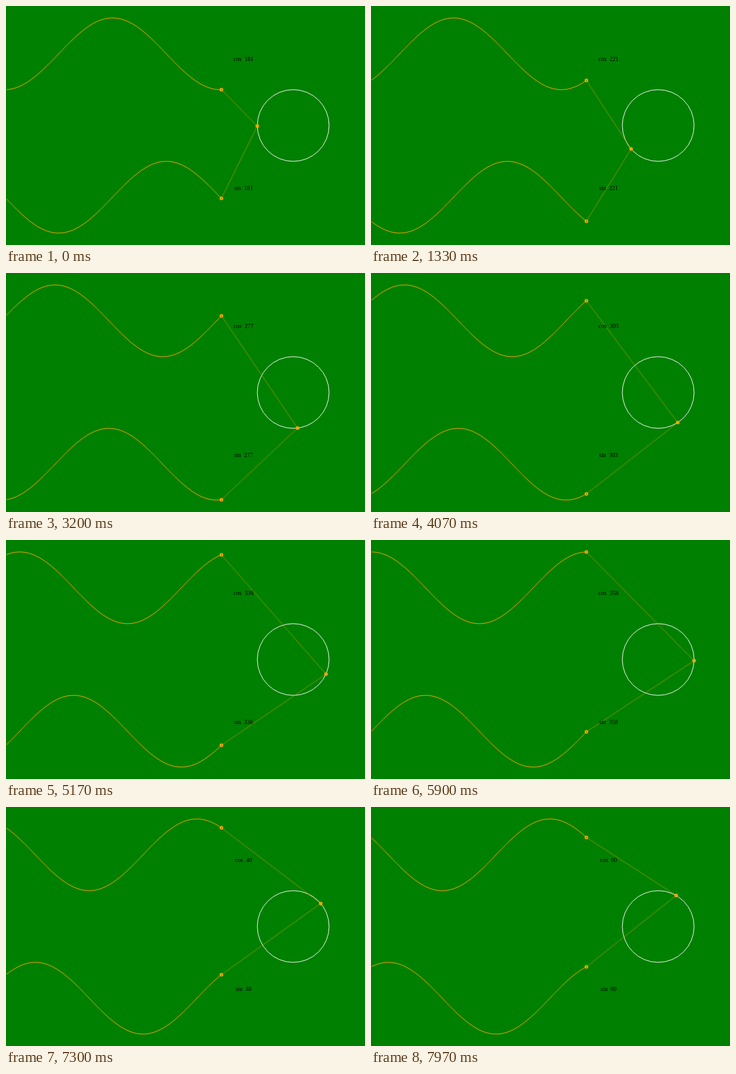
Recreate the animation shown at these times as an HTML page. Size 600 by 400 pixels, loop 8 s.

```html
<!DOCTYPE html>
<html lang="en">
<head>
<meta charset="utf-8">
<title>Sine and cosine</title>
<style>
  html, body { margin: 0; width: 100%; height: 100%; overflow: hidden; background: #008000; }
  svg { display: block; }
  text { font: 10px "Liberation Serif", serif; text-anchor: middle; white-space: pre; }
  .wave { fill: none; stroke: orange; }
  .link { fill: none; stroke: orange; stroke-width: .5; }
  .dot { fill: none; stroke: orange; stroke-width: 2; }
  #tip { fill: orange; fill-opacity: .5; }
</style>
</head>
<body>
<svg width="600" height="400" viewBox="0 0 600 400">
  <circle cx="480" cy="200" r="60" fill="none" stroke="#fff"/>
  <path id="cosWave" class="wave"/>
  <path id="sinWave" class="wave"/>
  <path id="links" class="link"/>
  <circle id="cosDot" class="dot" cx="360" r="2"/>
  <circle id="sinDot" class="dot" cx="360" r="2"/>
  <circle id="tip" class="dot" r="2"/>
  <text id="cosText" x="397" y="92"></text>
  <text id="sinText" x="397" y="308"></text>
</svg>
<script>
const LOOP = 8000, START = 181, R = 60, EDGE = 360;
const $ = id => document.getElementById(id);
const cos = deg => Math.cos(deg * Math.PI / 180);
const sin = deg => Math.sin(deg * Math.PI / 180);

// Three steps per 100 ms, on a 10 ms clock
function stepAt(ms) {
  const rest = ms % 100;
  return 3 * Math.floor(ms / 100) + (rest >= 30) + (rest >= 70);
}

function drawWave(name, fn, mid, angle) {
  const y = deg => (mid - R * fn(deg)).toFixed(2);
  const points = Array.from({ length: 360 }, (_, i) => `${EDGE - i},${y(angle + 1 - i)}`);
  $(name + "Wave").setAttribute("d", "M" + points.join("L"));
  $(name + "Dot").setAttribute("cy", y(angle + 1));
  $(name + "Text").textContent = `${name}\u00a0\u00a0${angle % 360}`;
  return points[0];
}

function render(ms) {
  const angle = START + stepAt(ms);
  const x = 480 + R * cos(angle), y = 200 - R * sin(angle);
  const top = drawWave("cos", cos, 80, angle);
  const bottom = drawWave("sin", sin, 320, angle);
  $("links").setAttribute("d", `M${top}L${x},${y}L${bottom}`);
  $("tip").setAttribute("cx", x);
  $("tip").setAttribute("cy", y);
}

const begin = performance.now();
function tick() {
  render((performance.now() - begin) % LOOP);
  requestAnimationFrame(tick);
}
tick();
</script>
</body>
</html>
```
